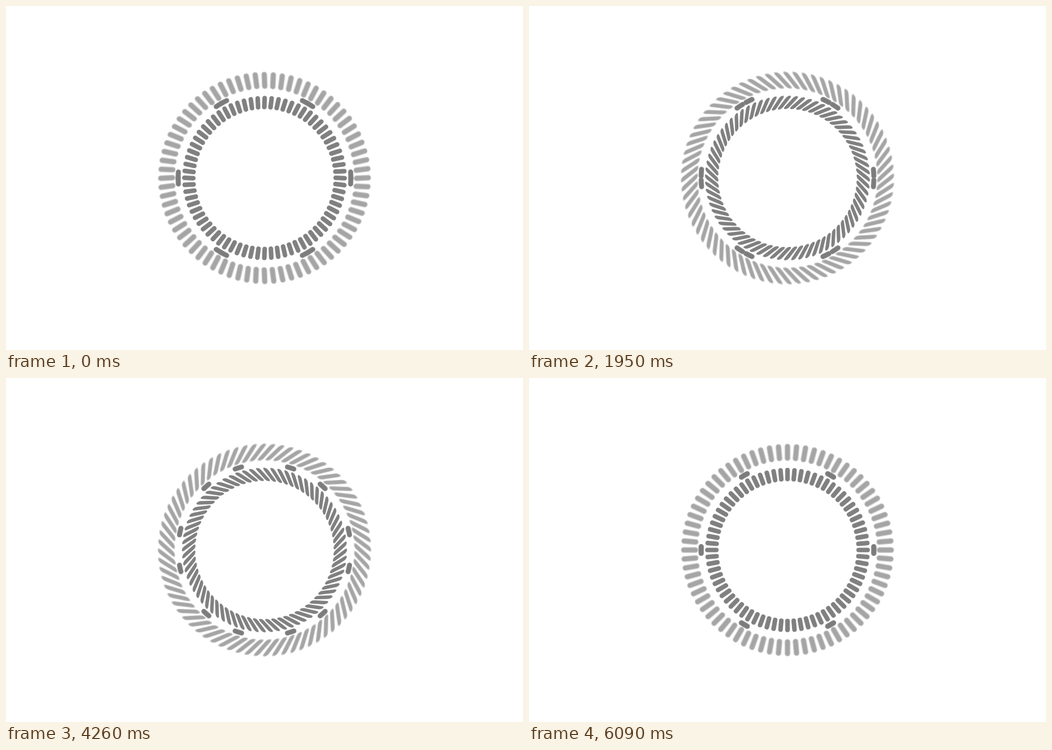
Write an HTML page with a canvas that moves like this. It is 916 px wide and 611 px high and loops after 6120 ms.

```html
<!DOCTYPE html>
<html lang="en">
<head>
<meta charset="utf-8">
<title>Counter-rotating rings</title>
<style>
  html, body { margin: 0; width: 100%; height: 100%; overflow: hidden; background: #fff; }
  canvas { display: block; width: 916px; height: 611px; }
</style>
</head>
<body>
<canvas id="stage" width="916" height="611"></canvas>
<script>
const ctx = document.getElementById('stage').getContext('2d');
const TAU = Math.PI * 2;
const STEP = 30, STEPS = 204;
const CX = 458, CY = 305.5;
const BARS = 72, MARKS = 6, MARK_RADIUS = 153;
const SWING = 0.149;
const SLANT = 0.86;

// Each layer: [half height, width, colour], drawn back to front.
const RINGS = [
  { radius: 173.5, dir: 1, layers: [[15.5, 10.5, '#c9c9c9'], [14, 7.4, '#a5a5a5']] },
  { radius: 134, dir: -1, layers: [[12, 8.2, '#8c8c8c'], [11.3, 6.8, '#808080']] }
];

function drawBar(radius, angle, slant, [half, width, color]) {
  const reach = half - width / 2;
  ctx.save();
  ctx.rotate(angle);
  ctx.translate(0, -radius);
  ctx.transform(1, 0, slant, 1, 0, 0);
  ctx.beginPath();
  ctx.moveTo(0, -reach);
  ctx.lineTo(0, reach);
  ctx.lineWidth = width;
  ctx.strokeStyle = color;
  ctx.stroke();
  ctx.restore();
}

// Bars lean with the speed of the ring's swing.
function drawRing({ radius, dir, layers }, turn) {
  const swing = dir * SWING * (1 - Math.cos(turn));
  const slant = dir * SLANT * Math.sin(Math.PI / 2 * Math.sin(turn));
  for (const layer of layers) {
    for (let i = 0; i < BARS; i++) {
      drawBar(radius, i * TAU / BARS + swing, slant, layer);
    }
  }
}

function drawMarks(turn, length, width, color) {
  const half = (length - width) / 2 / MARK_RADIUS;
  ctx.lineWidth = width;
  ctx.strokeStyle = color;
  for (const dir of [1, -1]) {
    for (let i = 0; i < MARKS; i++) {
      const angle = i * TAU / MARKS + dir * turn;
      ctx.beginPath();
      ctx.arc(0, 0, MARK_RADIUS, angle - half, angle + half);
      ctx.stroke();
    }
  }
}

function draw(time) {
  const step = Math.floor(time / STEP) % STEPS + 1;
  const turn = step / STEPS * TAU;
  ctx.setTransform(1, 0, 0, 1, 0, 0);
  ctx.fillStyle = '#fff';
  ctx.fillRect(0, 0, 916, 611);
  ctx.translate(CX, CY);
  ctx.lineCap = 'round';
  RINGS.forEach(ring => drawRing(ring, turn));
  drawMarks(turn, 21, 9, '#888');
  drawMarks(turn, 18, 6, '#7c7c7c');
}

const start = performance.now();
function tick() {
  draw(performance.now() - start);
  requestAnimationFrame(tick);
}
tick();
</script>
</body>
</html>
```
